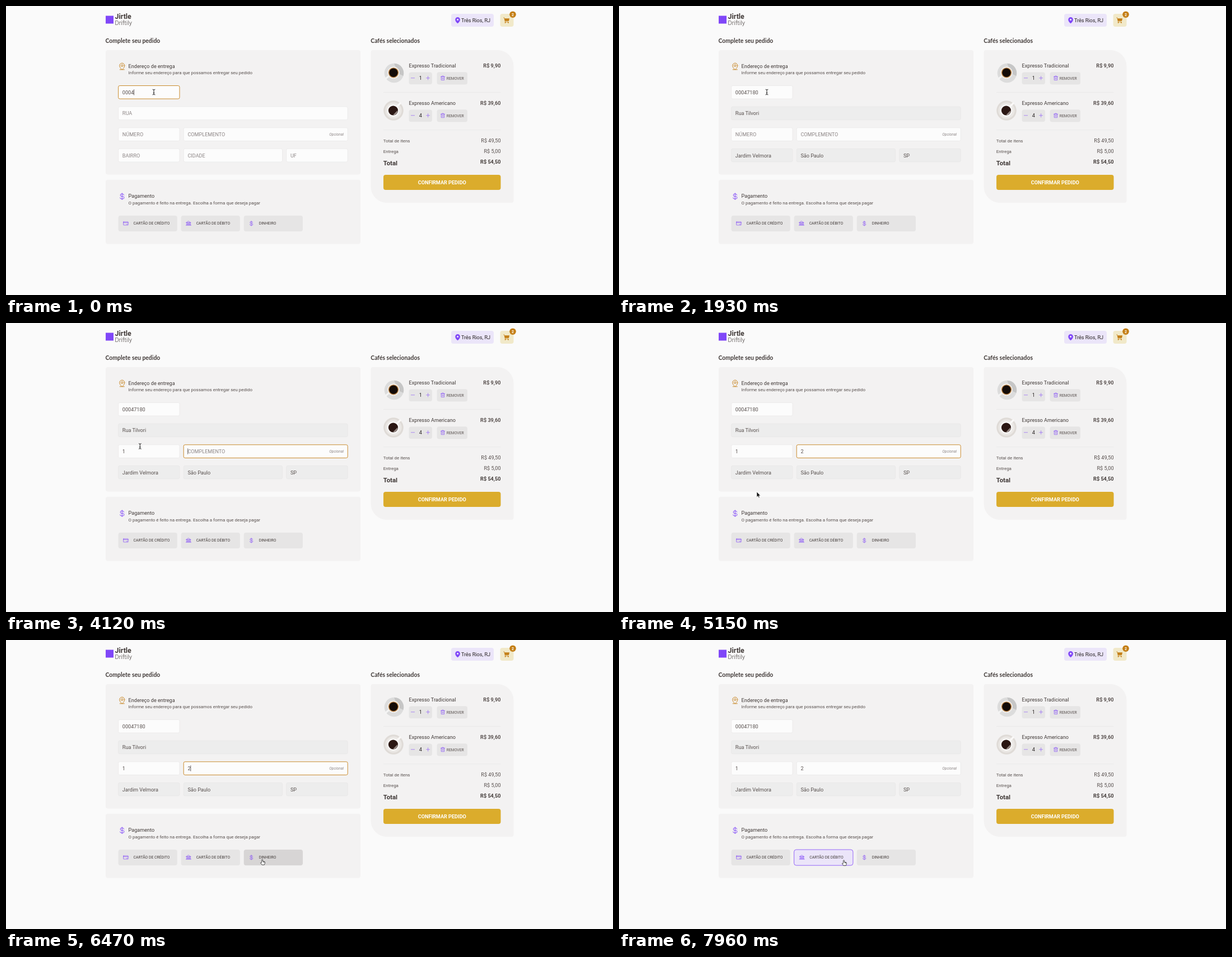
Write an HTML page that moves like this. It is 1084 px wide and 517 px high and loops after 8000 ms.

```html
<!DOCTYPE html>
<html lang="pt-BR">
<head>
<meta charset="utf-8">
<title>Checkout</title>
<style>
  html, body { margin: 0; width: 100%; height: 100%; overflow: hidden; background: #fafafa; }
  svg { display: block; width: 1084px; height: 517px; font-family: Roboto, sans-serif; }
</style>
</head>
<body>
<svg viewBox="0 0 1084 517"><g id="page"></g><g id="live"></g></svg>
<script>
const PURPLE = '#8047f8', LILAC = '#ebe5f9', GOLD = '#c47f17', GREY = '#e6e5e5',
      HOVER = '#d7d5d5', CARD = '#f3f2f2', TEXT = '#574f4d', DARK = '#403937', LABEL = '#8d8686';
const M = 9.1, S = 7.96, XS = 6.825;   // font sizes

const rect = (x, y, w, h, fill, r = 4, more = '') =>
  `<rect x="${x}" y="${y}" width="${w}" height="${h}" rx="${r}" fill="${fill}" ${more}/>`;
const text = (x, y, str, size = M, fill = TEXT, more = '') =>
  `<text x="${x}" y="${y}" font-size="${size}" fill="${fill}" ${more}>${str}</text>`;
const circle = (x, y, r, fill, more = '') =>
  `<circle cx="${x}" cy="${y}" r="${r}" fill="${fill}" ${more}/>`;
const line = (d, color, width = 0.65) =>
  `<path d="${d}" fill="none" stroke="${color}" stroke-width="${width}"/>`;
const BOLD = 'font-weight="700"', END = 'text-anchor="end"', MID = 'text-anchor="middle"';

// Icons live on a 256-unit grid
const ICONS = {
  pin: 'M160 104a32 32 0 1 1-64 0a32 32 0 1 1 64 0M208 104c0 72-80 128-80 128S48 176 48 104a80 80 0 0 1 160 0ZM56 232H200',
  dollar: 'M128 24V232M184 88a40 40 0 0 0-40-40H112a40 40 0 0 0 0 80h40a40 40 0 0 1 0 80H104a40 40 0 0 1-40-40',
  trash: 'M216 56H40M104 104V168M152 104V168M200 56V208a8 8 0 0 1-8 8H64a8 8 0 0 1-8-8V56M168 56V40a16 16 0 0 0-16-16H104a16 16 0 0 0-16 16V56',
  card: 'M32 56H224a8 8 0 0 1 8 8V192a8 8 0 0 1-8 8H32a8 8 0 0 1-8-8V64a8 8 0 0 1 8-8ZM24 96H232M168 168H200',
  bank: 'M24 96H232L128 32ZM56 96V176M104 96V176M152 96V176M200 96V176M32 176H224M16 208H240',
  minus: 'M40 128H216',
  plus: 'M40 128H216M128 40V216',
  place: 'M128 16a88 88 0 0 0-88 88c0 76 88 136 88 136s88-60 88-136a88 88 0 0 0-88-88Zm0 56a32 32 0 1 1 0 64a32 32 0 1 1 0-64Z',
  cart: 'M14 24H46L56 60H232L208 160H80L84 180H200V196H70L34 40H14ZM100 216a20 20 0 1 1-40 0a20 20 0 1 1 40 0M208 216a20 20 0 1 1-40 0a20 20 0 1 1 40 0'
};
const icon = (name, x, y, size, color, solid) =>
  `<path transform="translate(${x - size / 2} ${y - size / 2}) scale(${size / 256})" d="${ICONS[name]}" ` +
  (solid ? `fill="${color}" fill-rule="evenodd"/>`
         : `fill="none" stroke="${color}" stroke-width="17" stroke-linecap="round" stroke-linejoin="round"/>`);

const heading = (x, str) => text(x, 66.1, str, 10.4, DARK, BOLD + ' font-family="Lato, sans-serif"');

function cupA() {
  return circle(693, 120, 17.3, '#dcdcdc') +
    '<path d="M693 102.7A17.3 17.3 0 0 1 709.5 125L701 121Z" fill="#c6c6c6"/>' +
    '<path d="M684 125L677 131" stroke="#f4f4f4" stroke-width="3.2" stroke-linecap="round"/>' +
    circle(692, 119.3, 10.8, '#f3f1ef') + circle(692, 119.3, 9.1, '#b98043') + circle(692, 119.3, 7.7, '#130b08');
}
function cupB() {
  return circle(692, 187, 17.8, '#dfdbd7') + circle(692, 187, 14.6, '#ebe8e5') +
    '<path d="M698 180L704 174" stroke="#faf9f8" stroke-width="3.2" stroke-linecap="round"/>' +
    circle(691.5, 187, 11, '#f8f7f6') + circle(691.5, 187, 8.6, '#2b1713') +
    '<path d="M692 194L699.5 186.5A8.6 8.6 0 0 1 692 195.6Z" fill="#958883"/>';
}
function product(y, name, price, count) {
  return text(719.6, y + 3.2, name, M, DARK) + text(883.5, y + 3.2, price, M, TEXT, BOLD + END.replace(/^/, ' ')) +
    rect(719.5, y + 11.5, 41.5, 21.8, GREY) + icon('minus', 726.5, y + 21.8, 9, PURPLE) +
    text(740.2, y + 25.4, count, M, '#272221', MID) + icon('plus', 753.6, y + 21.8, 9, PURPLE) +
    rect(769.5, y + 11.2, 54.5, 22.3, GREY) + icon('trash', 780, y + 22.2, 10, PURPLE) +
    text(786.7, y + 24.8, 'REMOVER', XS);
}
function total(y, label, price) {
  return text(673.8, y + 2.7, label, S) + text(883.5, y + 3.3, price, M, TEXT, END);
}

page.innerHTML =
  rect(178, 17.5, 14, 14, PURPLE, 0) +
  text(194.6, 23.3, 'Jirtle', 12.4, DARK, BOLD) +
  text(194.6, 34, 'Driftily', 10.8, DARK, 'font-weight="300"') +
  rect(795, 14, 76, 23, LILAC) + icon('place', 806.6, 25.6, 12.6, PURPLE, true) +
  text(812.9, 29.2, 'Três Rios, RJ', M, '#272221') +
  rect(882.5, 14, 24, 23, '#f1e9c9') + icon('cart', 894, 25.5, 12.6, GOLD, true) +
  circle(905, 15.2, 5.8, GOLD) + text(905, 17.7, '2', XS, '#fff', `${BOLD} ${MID}`) +

  heading(177.6, 'Complete seu pedido') + heading(651.3, 'Cafés selecionados') +
  rect(178, 79, 455, 222.6, CARD) + rect(178, 310.8, 455, 115, CARD) +
  `<path d="M655.5 79H878A28.6 28.6 0 0 1 906.5 107.6V348a4 4 0 0 1-4 4H680A28.6 28.6 0 0 1 651.5 323.4V83a4 4 0 0 1 4-4Z" fill="${CARD}"/>` +

  icon('pin', 207.3, 108, 14.3, GOLD) + text(218.6, 110.7, 'Endereço de entrega', M, DARK) +
  text(218.6, 122.2, 'Informe seu endereço para que possamos entregar seu pedido', S) +
  icon('dollar', 207.3, 340.6, 14.3, PURPLE) + text(218.6, 343.1, 'Pagamento', M, DARK) +
  text(218.6, 354.5, 'O pagamento é feito na entrega. Escolha a forma que deseja pagar', S) +

  cupA() + product(107, 'Expresso Tradicional', 'R$ 9,90', 1) +
  cupB() + product(174, 'Expresso Americano', 'R$ 39,60', 4) +
  line('M674 154.5H883.5M674 221.8H883.5', GREY) +
  total(241, 'Total de itens', 'R$ 49,50') + total(260, 'Entrega', 'R$ 5,00') +
  text(673.8, 285, 'Total', 11.375, DARK, BOLD) + text(883.5, 282.1, 'R$ 54,50', M, DARK, `${BOLD} ${END}`) +
  rect(674, 302, 209.5, 27, '#dbac2c') + text(778.8, 318.5, 'CONFIRMAR PEDIDO', M, '#fff', `${BOLD} ${MID}`);

const ZIP = '00047180', FILLED = 1930;
const within = (t, [from, to]) => t >= from && t < to;
const after = (time, str) => t => t >= time ? str : '';

// x, y, width, label, value at t, focus span, locked once the address is found
const fields = [
  [200.6, 142.5, 109.4, 'CEP', t => ZIP.slice(0, 4 + [300, 740, 1190, 1340].filter(k => t >= k).length), [0, 1480]],
  [200.6, 180.1, 409.6, 'RUA', after(FILLED, 'Rua Tilvori'), [1480, FILLED], true],
  [200.6, 217.8, 109.4, 'NÚMERO', after(3820, '1'), [3230, 4120]],
  [317.2, 217.8, 293, 'COMPLEMENTO', after(4420, '2'), [4120, 6920]],
  [200.6, 255.3, 109.4, 'BAIRRO', after(FILLED, 'Jardim Velmora'), [0, 0], true],
  [317.2, 255.3, 176.4, 'CIDADE', after(FILLED, 'São Paulo'), [0, 0], true],
  [500.7, 255.3, 109.5, 'UF', after(FILLED, 'SP'), [0, 0], true]
];
const caretOff = [[3680, 3820], [5010, 5450], [5880, 6470]];

function field([x, y, w, label, value, focus, locks], t) {
  const str = value(t), active = within(t, focus), locked = locks && t >= FILLED;
  let out = rect(x, y, w, 23.6, locked ? '#ededed' : '#fcfcfc', 2.6,
    `stroke="${active ? GOLD : GREY}" stroke-width="${active ? 0.9 : 0.65}"`);
  out += text(x + 7.2, y + 15.2, str || label, M, str ? TEXT : LABEL);
  if (label === 'COMPLEMENTO') out += text(603.2, y + 14.1, 'Opcional', XS, LABEL, `font-style="italic" ${END}`);
  if (active && !caretOff.some(span => within(t, span))) {
    const cx = x + 7.5 + str.length * 5.11;
    out += line(`M${cx} ${y + 6.6}v10.4`, DARK, 0.75);
  }
  return out;
}

// x, icon, label, hover spans, selected span
const options = [
  [200.5, 'card', 'CARTÃO DE CRÉDITO', [[5450, 6030]], [0, 0]],
  [312.6, 'bank', 'CARTÃO DE DÉBITO', [[6030, 6320], [7360, 7960]], [7960, 8000]],
  [424.7, 'dollar', 'DINHEIRO', [[6320, 6920]], [6920, 7960]]
];
function option([x, name, label, hovers, chosen], t) {
  const on = within(t, chosen), hover = hovers.some(span => within(t, span)), dx = on ? 0.65 : 0;
  return rect(x, 375, 105.3, 28.2, on ? LILAC : hover ? HOVER : GREY, 4,
      on ? `stroke="${PURPLE}" stroke-width=".8"` : '') +
    icon(name, x + 13.4 + dx, 389, 10.4, PURPLE) +
    text(x + 27.1 + dx, 391.3, label, XS, DARK);
}

const POINTERS = {
  beam: '<path d="M-2.3-4.8Q0-4.8 0-3.4Q0-4.8 2.3-4.8M0-3.6V3.6M-2.3 4.8Q0 4.8 0 3.4Q0 4.8 2.3 4.8M-1.2 1.4H1.2" fill="none" stroke="#222"/>',
  arrow: '<path d="M0 0V9.4L2.2 7.5L3.6 10.6L5.1 9.9L3.8 6.9H6.6Z" fill="#111" stroke="#fff" stroke-width=".6"/>',
  hand: '<path d="M-1.6 1V-4Q-.7-5.2.2-4V-1Q3.6-.9 4-.1V2.5L3 5.2H-1.2L-3.9 1.7Q-3.7 0-1.6 1.8M1.5-.8V1M2.8-.6V1" fill="#fff" stroke="#222" stroke-width=".8" stroke-linejoin="round"/>'
};
const path = [
  [0, 264, 154, 'beam'], [2800, 256, 172, 'beam'], [2940, 245, 205, 'beam'], [3090, 239.3, 220.5, 'beam'],
  [4860, 240, 232, 'beam'], [5010, 242, 262, 'arrow'], [5150, 246, 302, 'arrow'], [5300, 252, 348, 'arrow'],
  [5450, 259, 383, 'hand'], [5590, 272, 395, 'hand'], [5740, 295, 398, 'hand'], [5880, 315.3, 392.4, 'arrow'],
  [6030, 340, 396, 'hand'], [6180, 385, 397, 'hand'], [6320, 432, 397, 'hand'], [6470, 458.3, 397, 'hand'],
  [7220, 428, 398, 'hand'], [7360, 402.2, 398.4, 'hand']
];
function pointer(t) {
  const [, x, y, kind] = path.filter(p => t >= p[0]).pop();
  return `<g transform="translate(${x} ${y})">${POINTERS[kind]}</g>`;
}

let shown = '';
function draw(now) {
  const t = now % 8000;
  const next = fields.map(f => field(f, t)).join('') + options.map(o => option(o, t)).join('') + pointer(t);
  if (next !== shown) live.innerHTML = shown = next;
}
const start = performance.now();
(function tick() {
  draw(performance.now() - start);
  requestAnimationFrame(tick);
})();
</script>
</body>
</html>
```
